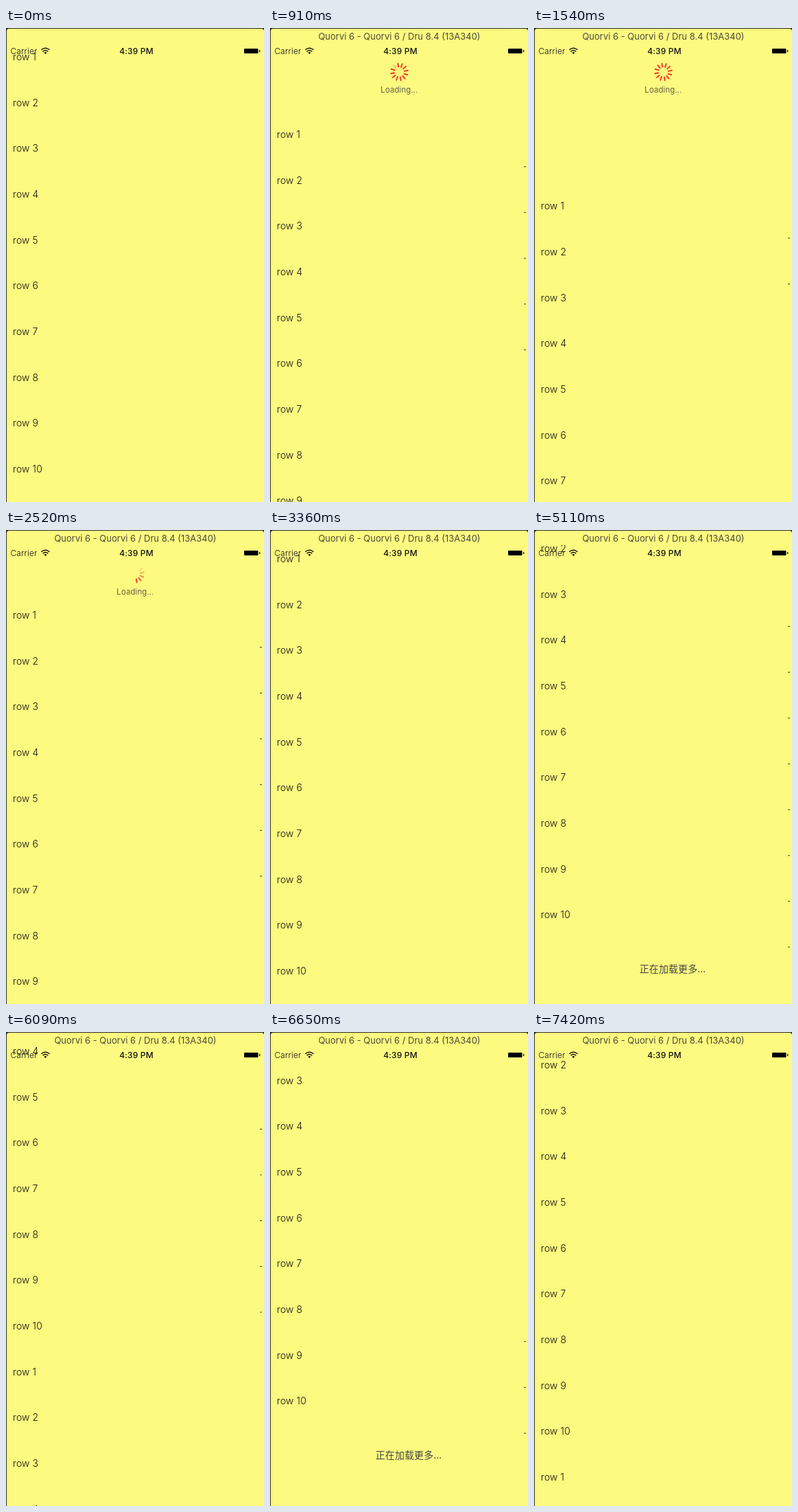
These frames come from a looping animation (376 px wide and 690 px high, 8 s). An HTML page:

```html
<!DOCTYPE html>
<html lang="en">
<head>
<meta charset="utf-8">
<title>Pull to refresh</title>
<style>
  html, body { margin: 0; width: 100%; height: 100%; overflow: hidden; background: #2c2c2e; }
  svg { display: block; }
  text { font-family: Inter, Roboto, "Liberation Sans", sans-serif; fill: #111; }
  .mid { text-anchor: middle; }
  #title { font-size: 13px; fill: #4b4a38; }
  .carrier { font-size: 12px; font-weight: 300; letter-spacing: .1px; }
  .clock { font-size: 12px; font-weight: 500; letter-spacing: .15px; }
  #rows text { font-size: 14px; font-weight: 300; letter-spacing: .1px; }
  #label { font-size: 11.5px; font-weight: 300; letter-spacing: .15px; fill: #333; }
  #footer { font: 300 14px "Noto Sans CJK SC", "Noto Sans CJK", "Noto Sans CJK JP", sans-serif; fill: #444; }
  #spinner line { stroke: #f23a24; stroke-width: 2; stroke-linecap: round; }
  #ticks line { stroke: #55543c; stroke-width: 1.2; }
</style>
</head>
<body>
<svg width="376" height="690" viewBox="0 0 376 690">
  <defs>
    <clipPath id="screen"><rect x="1" y="22" width="375" height="668"/></clipPath>
    <clipPath id="gap"><rect id="gapBox" x="1" y="22" width="375" height="0"/></clipPath>
    <clipPath id="bar"><rect id="barBox" x="370" y="22" width="3" height="0"/></clipPath>
  </defs>
  <path d="M1 690V5Q1 1 5 1H372Q376 1 376 5V690Z" fill="#fdfa80"/>
  <text id="title" class="mid" x="188.5" y="17">Quorvi 6 - Quorvi 6 / Dru 8.4 (13A340)</text>

  <g clip-path="url(#gap)">
    <g id="spinner" transform="translate(188.5 64)"></g>
    <text id="label" class="mid" x="188.5" y="93.5">Loading...</text>
  </g>
  <g clip-path="url(#screen)">
    <g id="rows"><text id="footer" class="mid" x="202"></text></g>
  </g>
  <g clip-path="url(#bar)"><g id="ticks"></g></g>

  <text class="carrier" x="6.5" y="37.5">Carrier</text>
  <g fill="none" stroke="#111" stroke-width="1.5">
    <path d="M51.5 31.8Q57.5 26.6 63.5 31.8"/>
    <path d="M53.6 34.2Q57.5 30.8 61.4 34.2"/>
  </g>
  <path d="M55.4 35.8Q57.5 34 59.6 35.8L57.5 38Z" fill="#111"/>
  <text class="clock mid" x="190" y="37.5">4:39 PM</text>
  <rect x="347" y="30" width="20.5" height="7" rx="1"/>
  <rect x="369" y="32" width="1.3" height="3" rx=".6"/>
</svg>
<script>
const LOOP = 8000, STEP = 70, TOP = 22, VIEW = 2000 / 3, ROW = VIEW / 10, PAD = 60;
const MAX_ROWS = 30, SPOKES = 12;
const $ = id => document.getElementById(id);

function add(parent, tag, attrs, text = '') {
  const el = document.createElementNS('http://www.w3.org/2000/svg', tag);
  for (const key in attrs) el.setAttribute(key, attrs[key]);
  el.textContent = text;
  return parent.appendChild(el);
}

const linear = p => p;
const easeOut = p => 1 - (1 - p) ** 3;
const easeInOut = p => p * p * (3 - 2 * p);

// [time, scroll offset, easing on the way there]
const SCROLL = [
  [0, 0], [630, 0, linear],
  [1540, -217.3, p => 1 - (1 - p) ** 2], [2240, -82, easeOut], [2520, -82, linear], [3360, 0, easeInOut],
  [4130, 0, linear], [4620, 106, easeInOut], [4760, 111, easeOut], [5390, 60.5, easeInOut],
  [6020, 60.5, linear], [6090, 214, linear], [6720, 772, easeOut], [7280, 727.2, easeInOut],
  [LOOP, 727.2, linear]
];
const BAR_SHOWN = [[700, 3150], [4200, 5250], [6090, 7210]];

function scrollAt(t) {
  const i = SCROLL.findIndex(key => key[0] > t);
  const [t0, s0] = SCROLL[i - 1], [t1, s1, ease] = SCROLL[i];
  return s0 + (s1 - s0) * ease((t - t0) / (t1 - t0));
}

const rows = [], ticks = [];
for (let i = 0; i < MAX_ROWS; i++) {
  const y = TOP + i * ROW;
  rows.push(add($('rows'), 'text', { x: 10, y: y + 25 }, 'row ' + (i % 10 + 1)));
  ticks.push(add($('ticks'), 'line', { x1: 370, x2: 373, y1: y + ROW, y2: y + ROW }));
}
$('footer').textContent = '正在加载更多...';

const spokes = [];
for (let i = 0; i < SPOKES; i++) {
  spokes.push(add($('spinner'), 'line', { x1: 7.5, x2: 12.5, transform: `rotate(${i * 30 - 10})` }));
}

function drawSpinner(t, pull) {
  const head = 3 + Math.floor((t - 2520) * SPOKES / 1000);
  spokes.forEach((spoke, i) => {
    const behind = ((head - i) % SPOKES + SPOKES) % SPOKES;
    const fromTop = (i + 3) % SPOKES;
    const alpha = t <= 1540 ? Math.min(1, Math.max(0, pull / 10 - fromTop))
                            : Math.max(0, 1 - behind * .21);
    spoke.setAttribute('opacity', alpha);
  });
}

function drawBar(t, s, count) {
  const content = count * ROW + PAD;
  const above = Math.max(0, -s), below = Math.max(0, s - content + VIEW);
  const length = VIEW * VIEW / content - above - below;
  const y = below ? VIEW - length : Math.max(0, s) / content * VIEW;
  const shown = BAR_SHOWN.some(([from, to]) => t >= from && t <= to);
  $('barBox').setAttribute('y', TOP + y);
  $('barBox').setAttribute('height', shown ? length : 0);
}

function draw(time) {
  const t = Math.floor(time % LOOP / STEP) * STEP;
  const s = scrollAt(t);
  const count = t < 5390 ? 10 : t < 7420 ? 20 : 30;
  const shift = `translate(0 ${-s})`;

  $('title').style.display = t < 560 ? 'none' : '';
  $('rows').setAttribute('transform', shift);
  $('ticks').setAttribute('transform', shift);
  $('footer').setAttribute('y', TOP + count * ROW + 36.5);
  for (let i = 0; i < MAX_ROWS; i++) {
    rows[i].style.display = ticks[i].style.display = i < count ? '' : 'none';
  }
  $('gapBox').setAttribute('height', Math.max(0, -s));
  drawSpinner(t, -s);
  drawBar(t, s, count);
}

const start = performance.now();
function tick() {
  draw(performance.now() - start);
  requestAnimationFrame(tick);
}
tick();
</script>
</body>
</html>
```
